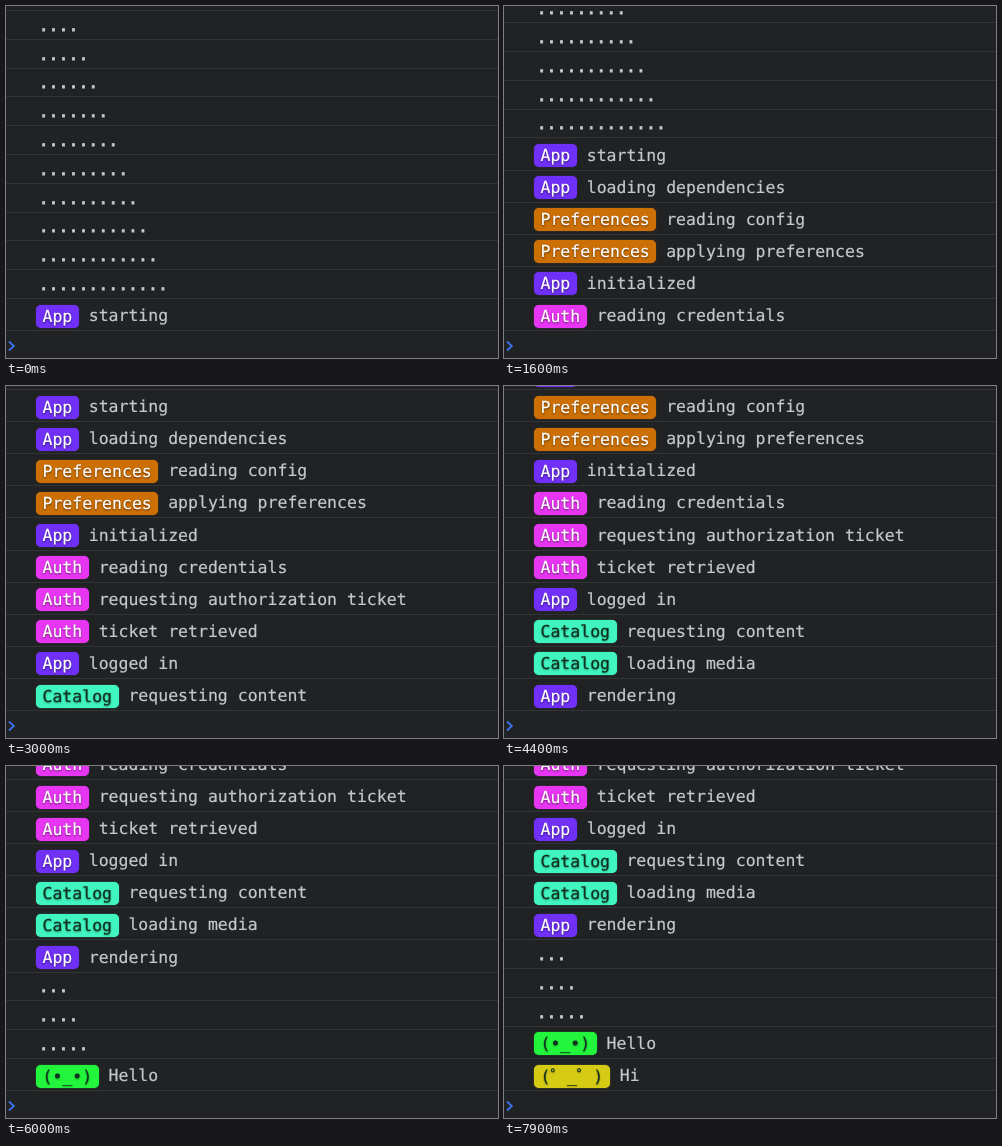
Animation, 492 px wide and 352 px high, one loop 8 s. Source, as an HTML page:

```html
<!DOCTYPE html>
<html lang="en">
<meta charset="utf-8">
<title>Console log</title>
<style>
  html, body { margin: 0; width: 100%; height: 100%; overflow: hidden; background: #202223; }
  body {
    position: relative;
    color: #c6c9cb;
    font: 16.5px/29px "DejaVu Sans Mono", "Noto Sans CJK JP", monospace;
    text-rendering: geometricPrecision;
    -webkit-text-stroke: .2px;
    white-space: pre;
  }
  #log { position: absolute; left: 0; right: 0; bottom: 27px; }
  .row {
    box-sizing: border-box;
    display: flex;
    align-items: flex-end;
    height: 32.1px;
    padding-left: 30px;
    border-bottom: 1px solid #323536;
  }
  .row.dots {
    height: 28.8px;
    padding-left: 32.7px;
    line-height: 27px;
    -webkit-text-stroke: .8px;
  }
  .row[hidden] { display: none; }
  .badge {
    height: 23px;
    line-height: 23px;
    margin: 0 9.9px 2.5px 0;
    padding: 0 6.5px;
    border-radius: 5px;
    color: #fff;
    text-shadow: 0 1px 2px #0009;
  }
  .badge.light { color: #12301f; text-shadow: 0 1px 2px #0006; }
  svg { position: absolute; left: 0; top: 331.5px; }
</style>
<div id="log"></div>
<svg width="14" height="16" fill="none" stroke="#3b74ee" stroke-width="1.8">
  <path d="M3 3.5 L7.8 8 L3 12.5"/>
</svg>
<script>
  const LOOP = 8000;
  const log = document.getElementById('log');
  const rows = [];

  function addRow(at, className) {
    const el = document.createElement('div');
    el.className = className;
    log.append(el);
    rows.push({ at, el });
    return el;
  }

  const dots = (at, count) => addRow(at, 'row dots').append('.'.repeat(count));

  const logger = (label, color, light) => (at, message) => {
    const badge = document.createElement('span');
    badge.className = light ? 'badge light' : 'badge';
    badge.style.background = color;
    badge.style.boxShadow = `0 0 1px ${color}`;
    badge.textContent = label;
    addRow(at, 'row').append(badge, message);
  };

  const app = logger('App', '#7030f8');
  const preferences = logger('Preferences', '#cc7005');
  const auth = logger('Auth', '#e636f2');
  const catalog = logger('Catalog', '#40f5c0', true);
  const green = logger('(•_•)', '#22f53c', true);
  const yellow = logger('(゜_゜)', '#d6cb14', true);

  for (let n = 3; n <= 13; n++) dots(0, n);
  app(0, 'starting');
  app(400, 'loading dependencies');
  preferences(800, 'reading config');
  preferences(1100, 'applying preferences');
  app(1300, 'initialized');
  auth(1600, 'reading credentials');
  auth(1900, 'requesting authorization ticket');
  auth(2200, 'ticket retrieved');
  app(2400, 'logged in');
  catalog(2700, 'requesting content');
  catalog(3600, 'loading media');
  app(4200, 'rendering');
  dots(4900, 3);
  dots(5200, 4);
  dots(5500, 5);
  green(5900, 'Hello');
  yellow(7100, 'Hi');

  function draw() {
    const t = performance.now() % LOOP;
    for (const { at, el } of rows) el.hidden = t < at;
    requestAnimationFrame(draw);
  }
  draw();
</script>
</html>
```
